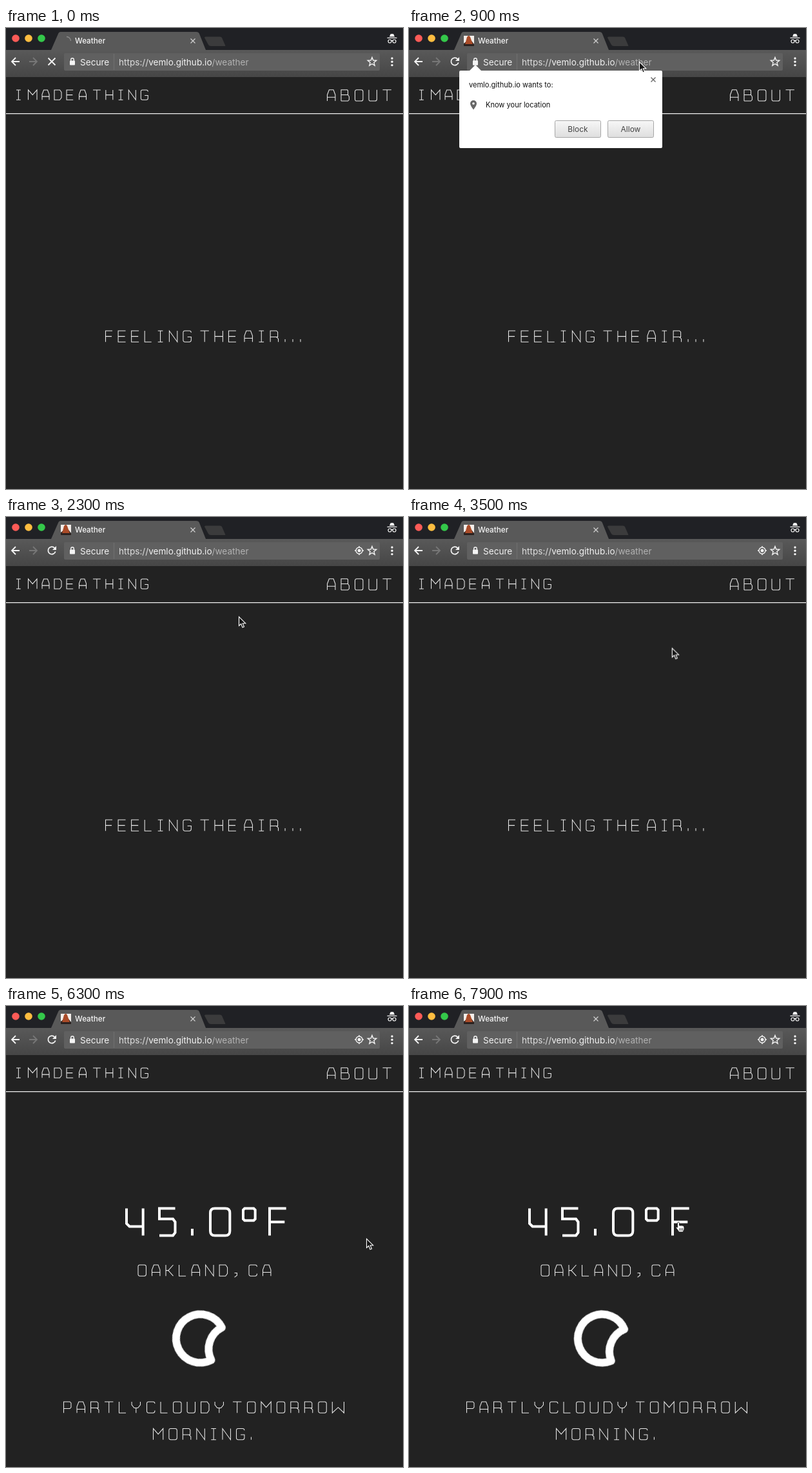
An HTML page that plays this animation: 616x714 px, repeating every 8000 ms.

```html
<!DOCTYPE html>
<html lang="en">
<head>
<meta charset="utf-8">
<title>Weather</title>
<style>
  html, body { margin: 0; width: 100%; height: 100%; overflow: hidden; background: #222; }
  svg { display: block; width: 616px; height: 714px; font-family: Inter, "Open Sans", sans-serif; }
  .line { fill: none; stroke: #f4f4f4; stroke-width: 1.8; }
  .fine { stroke-width: 1.4; }
  .thin { fill: transparent; }
  .stroke { fill: none; stroke: #e8e8e8; stroke-width: 1.05; vector-effect: non-scaling-stroke; }
  .bold + g .stroke { stroke: #fff; stroke-width: 4; }

  .loading, .ready, .popup, .granted, .waiting, .report, .hover, .pointer, .arrow, .hand {
    animation: 8s step-end infinite;
  }
  .loading { animation-name: loading; }
  .ready { animation-name: ready; }
  .popup { animation-name: popup; }
  .granted { animation-name: granted; }
  .waiting { animation-name: waiting; }
  .report { animation-name: report; }
  .hover { animation-name: hover; }
  .arrow { animation-name: arrow; }
  .hand { animation-name: hand; }
  .pointer { animation-name: appear, move; animation-timing-function: step-end, linear; }
  .moon { animation: swing 8s linear infinite; }

  @keyframes loading { 0% { opacity: 1 } 1.25%, 100% { opacity: 0 } }
  @keyframes ready { 0% { opacity: 0 } 1.25%, 100% { opacity: 1 } }
  @keyframes popup {
    0% { opacity: 0 } 1.25% { opacity: .4 } 2.5% { opacity: .85 }
    3.75% { opacity: 1 } 28.75%, 100% { opacity: 0 }
  }
  @keyframes granted { 0% { opacity: 0 } 28.75%, 100% { opacity: 1 } }
  @keyframes waiting { 0% { opacity: 1 } 78.75%, 100% { opacity: 0 } }
  @keyframes report { 0% { opacity: 0 } 78.75%, 100% { opacity: 1 } }
  @keyframes hover { 0% { fill: #444 } 20%, 100% { fill: #000 } }
  @keyframes appear { 0% { opacity: 0 } 11.25%, 100% { opacity: 1 } }
  @keyframes arrow { 0% { opacity: 1 } 97.5%, 100% { opacity: 0 } }
  @keyframes hand { 0% { opacity: 0 } 97.5%, 100% { opacity: 1 } }
  @keyframes move {
    0%, 11.25% { transform: translate(357px, 52px); animation-timing-function: ease-in; }
    15% { transform: translate(468px, 110px); }
    17% { transform: translate(475px, 150px); }
    19% { transform: translate(440px, 167px); animation-timing-function: ease-out; }
    21.25% { transform: translate(363px, 157px); }
    22.5%, 40.6% { transform: translate(361px, 154px); animation-timing-function: ease-in-out; }
    50%, 89.4% { transform: translate(559px, 360px); animation-timing-function: ease-in-out; }
    98.75%, 100% { transform: translate(418px, 334px); }
  }
  @keyframes swing {
    0%, 78.75% {
      transform: translate(-6px, 0) rotate(18deg);
      animation-timing-function: cubic-bezier(.33, .67, .67, 1);
    }
    98.75%, 100% { transform: translate(-8px, 0) rotate(22.5deg); }
  }
</style>
</head>
<body>
<svg viewBox="0 0 616 714">
  <defs>
    <linearGradient id="bar" x2="0" y2="1">
      <stop stop-color="#595959"/><stop offset="1" stop-color="#464646"/>
    </linearGradient>
    <linearGradient id="button" x2="0" y2="1">
      <stop stop-color="#f7f7f7"/><stop offset="1" stop-color="#dedede"/>
    </linearGradient>
  </defs>

  <!-- page -->
  <path fill="#222" d="M0 76H616V714H0Z"/>
  <path fill="#f0f0f0" d="M0 132H616V133.2H0Z"/>
  <g font-size="15.2">
    <text class="thin" x="16" y="96">I</text>
    <text class="thin" x="34.5" y="96">MADE</text>
    <text class="thin" x="113.5" y="96">A</text>
    <text class="thin" x="135" y="96">THING</text>
  </g>

  <g font-size="17.2">
    <text class="thin" x="498.5" y="95.8">ABOUT</text>
    <g class="waiting">
      <text class="thin" x="154.5" y="469">FEELING</text>
      <text class="thin" x="301.5" y="469">THE</text>
      <text class="thin" x="370" y="469">AIR...</text>
    </g>
    <g class="report">
      <text class="thin" x="205" y="401">OAKLAND,</text>
      <text class="thin" x="377" y="401">CA</text>
      <text class="thin" x="89.5" y="613">PARTLY</text>
      <text class="thin" x="218.5" y="613">CLOUDY</text>
      <text class="thin" x="352" y="613">TOMORROW</text>
      <text class="thin" x="228.5" y="654.5">MORNING.</text>
    </g>
  </g>

  <g class="report">
    <g font-size="42">
      <text class="thin bold" x="187" y="313.5">4</text>
      <text class="thin bold" x="238" y="313.5">5</text>
      <text class="thin bold" x="289" y="313.5">.</text>
      <text class="thin bold" x="317" y="313.5">0</text>
      <text class="thin bold" x="368" y="313.5">º</text>
      <text class="thin bold" x="409" y="313.5">F</text>
    </g>
    <g transform="translate(307.5 515)">
      <path class="moon" fill="none" stroke="#fff" stroke-width="12" stroke-linejoin="round"
        d="M26.5 26.5A37.5 37.5 0 1 1 26.5 -26.5A37.5 37.5 0 0 0 26.5 26.5Z"/>
    </g>
  </g>

  <!-- tab strip -->
  <path fill="#202125" d="M0 0H616V34H0Z"/>
  <circle cx="15" cy="16" r="5.8" fill="#fc5b57"/>
  <circle cx="35" cy="16" r="5.8" fill="#fdbd40"/>
  <circle cx="55" cy="16" r="5.8" fill="#34c84a"/>
  <path fill="#595959" d="M70 34L81 9Q82 6 85 6H295Q299 6 300 9L310 34Z"/>
  <path fill="#3b3b3c" d="M310 13.5H332Q334 13.5 335 15L340 26.5Q341 28 339 28H318Q315 28 314 26L308 15Q308 13.5 310 13.5Z"/>
  <text x="107" y="24" font-size="11.7" font-weight="500" fill="#f7f7f7">Weather</text>
  <path class="line" style="stroke:#d0d0d0;stroke-width:1.2" d="M286.5 16.5L293.5 23.5M293.5 16.5L286.5 23.5"/>
  <path class="loading line fine" style="stroke:#8b8b8b" d="M94 13.5A6.5 6.5 0 0 1 100.5 20"/>
  <g class="ready">
    <path fill="#f3eeea" d="M85 12H101V28H85Z"/>
    <path fill="#2b211f" d="M85 24L90 20H97L101 25V28H85Z"/>
    <path fill="#a94b28" d="M90 14Q93 10 95 14L99 25H87Z"/>
  </g>
  <path fill="#f4f4f4" d="M595 13.5L596.5 9.5Q599 8.5 601.5 9.5L603 13.5ZM591.5 14.8H606.5V16H591.5Z"/>
  <g class="line" style="stroke-width:1.2">
    <circle cx="595.5" cy="20.5" r="2.5"/><circle cx="602.5" cy="20.5" r="2.5"/>
    <path d="M598 20Q599 19 600 20"/>
  </g>

  <!-- toolbar -->
  <path fill="url(#bar)" d="M0 34H616V76H0Z"/>
  <rect x="90" y="39" width="490" height="27" rx="2" fill="#606060"/>
  <path class="line" d="M21 52H9M15 46L9 52L15 58"/>
  <path class="line" style="stroke:#777" d="M36 52H48M42 46L48 52L42 58"/>
  <path class="loading line" d="M65.5 46.5L76.5 57.5M76.5 46.5L65.5 57.5"/>
  <g class="ready">
    <path class="line" d="M75.5 48A5.8 5.8 0 1 0 76.7 53.5"/>
    <path fill="#f4f4f4" d="M78 45V51H72Z"/>
  </g>
  <rect x="99" y="50.5" width="8" height="7" rx="1" fill="#f4f4f4"/>
  <path class="line fine" d="M100.7 51V49A2.3 2.3 0 0 1 105.3 49V51"/>
  <path stroke="#707070" d="M167.5 40V65"/>
  <g font-size="13.6" fill="#f2f2f2">
    <text x="115" y="57.5">Secure</text>
    <text x="175" y="57.5"><tspan fill="#dedede">https://</tspan>vemlo.github.io<tspan fill="#b2b2b2">/weather</tspan></text>
  </g>
  <g class="granted">
    <circle class="line fine" cx="548" cy="52" r="5"/>
    <circle cx="548" cy="52" r="2.5" fill="#f4f4f4"/>
    <path class="line fine" d="M548 45V47M548 57V59M541 52H543M553 52H555"/>
  </g>
  <path id="star" class="line fine"/>
  <g fill="#f4f4f4">
    <circle cx="599" cy="47" r="1.7"/><circle cx="599" cy="52.3" r="1.7"/><circle cx="599" cy="57.6" r="1.7"/>
  </g>

  <!-- permission prompt -->
  <g class="popup">
    <path fill="#fff" d="M80 66H94L103 57L112 66H391Q393 66 393 68V184Q393 186 391 186H80Q78 186 78 184V68Q78 66 80 66Z"/>
    <rect x="99" y="50.5" width="8" height="7" rx="1" fill="#f4f4f4"/>
    <path class="line fine" style="stroke:#666" d="M375.5 76.5L382.5 83.5M382.5 76.5L375.5 83.5"/>
    <g font-size="11.05" fill="#111">
      <text x="93" y="92">vemlo.github.io wants to:</text>
      <text x="119" y="123">Know your location</text>
    </g>
    <path fill="#666" d="M100 126.5Q95 120 95 117A5 5 0 0 1 105 117Q105 120 100 126.5Z"/>
    <circle cx="100" cy="117" r="1.8" fill="#fff"/>
    <g fill="url(#button)" stroke="#a6a6a6">
      <rect x="226.5" y="143.5" width="71" height="26" rx="2"/>
      <rect x="308.5" y="143.5" width="71" height="26" rx="2"/>
    </g>
    <g font-size="12" text-anchor="middle">
      <text x="262" y="161" fill="#444">Block</text>
      <text class="hover" x="344" y="161">Allow</text>
    </g>
  </g>

  <g class="pointer">
    <path class="arrow" fill="#161616" stroke="#fff" stroke-width="1.1"
      d="M.5 .5V14.5L3.7 11.5L6 17L8.5 16L6.2 10.7H10.7Z"/>
    <g class="hand" stroke="#222" stroke-width=".9">
      <path fill="#fff" d="M-1.5 2Q0 -1 1.5 2V6H6Q9 6 9 9V12L7 16H1L-4 9Q-4 7 -1.5 9Z"/>
      <path d="M2 10V14M4.3 10V14M6.6 10V14"/>
    </g>
  </g>
</svg>
<script>
  // Single-stroke lettering on an 18-unit cap height.
  const arch = 'V3Q0 0 3 0H10Q13 0 13 3';
  const bowl = 'V15Q13 18 10 18H3Q0 18 0 15';
  const round = `M0 15${arch}${bowl}Z`;
  const glyphs = {
    A: 'M0 18V8L3 0H10L13 8V18M0 12H13',
    B: 'M0 18V0H10L11 1V8H0M11 8L13 11V16L11 18H0',
    C: `M13 14${bowl}${arch}`,
    D: 'M0 18V0H10L13 4V14L10 18Z',
    E: 'M12 0H0V18H12M0 9H11',
    F: 'M11 0H0V18M0 9H10',
    G: `M7 10H13${bowl}${arch}`,
    H: 'M0 0V18M13 0V18M0 9H13',
    I: 'M0 0H8M4 0V18M0 18H8',
    K: 'M0 0V18M12 0L4 9H0M4 9L12 18',
    L: 'M0 0V18H11',
    M: 'M0 18V0L8 9L16 0V18',
    N: 'M0 18V0L13 18V0',
    O: round,
    P: 'M0 18V0H10L12 2V9L10 11H0',
    R: 'M0 18V0H10L12 2V10H0M10 10L13 13V18',
    T: 'M0 0H14M7 0V18',
    U: `M13 0${bowl}V0`,
    W: 'M0 0V18L9.5 9L19 18V0',
    Y: 'M0 0V5L4 10H10L14 5V0M7 10V18',
    '.': 'M0 13.5V18',
    ',': 'M0 13H4V17L0 20',
    4: 'M0 0V10L2 12H11M11 0V18',
    5: 'M10.5 0H0V7H9L10.5 9V16L9 18H0',
    0: round,
    'º': 'M1 0H7L8 1V7L7 8H1L0 7V1Z'
  };
  const bearing = { I: 1, '.': 1.5, ',': 2 };
  const tracking = 9.5;

  const make = (name, attrs) => {
    const el = document.createElementNS('http://www.w3.org/2000/svg', name);
    for (const key in attrs) el.setAttribute(key, attrs[key]);
    return el;
  };

  function letter(text) {
    const cap = parseFloat(getComputedStyle(text).fontSize);
    const [x, y] = ['x', 'y'].map(name => text.getAttribute(name));
    const group = make('g', { transform: `translate(${x} ${y}) scale(${cap / 18})` });
    text.after(group);
    let pen = 0;
    for (const ch of text.textContent) {
      const side = bearing[ch] || 0;
      if (pen) pen += side;
      const path = make('path', { class: 'stroke', d: glyphs[ch], transform: `translate(${pen} 0)` });
      group.append(path);
      pen += path.getBBox().width + side + tracking;
    }
  }
  document.querySelectorAll('.thin').forEach(letter);

  const corners = Array.from({ length: 10 }, (_, i) => {
    const radius = i % 2 ? 3 : 7, angle = (i / 5 - .5) * Math.PI;
    return `${568 + radius * Math.cos(angle)} ${52.5 + radius * Math.sin(angle)}`;
  });
  document.getElementById('star').setAttribute('d', `M${corners.join('L')}Z`);
</script>
</body>
</html>
```
